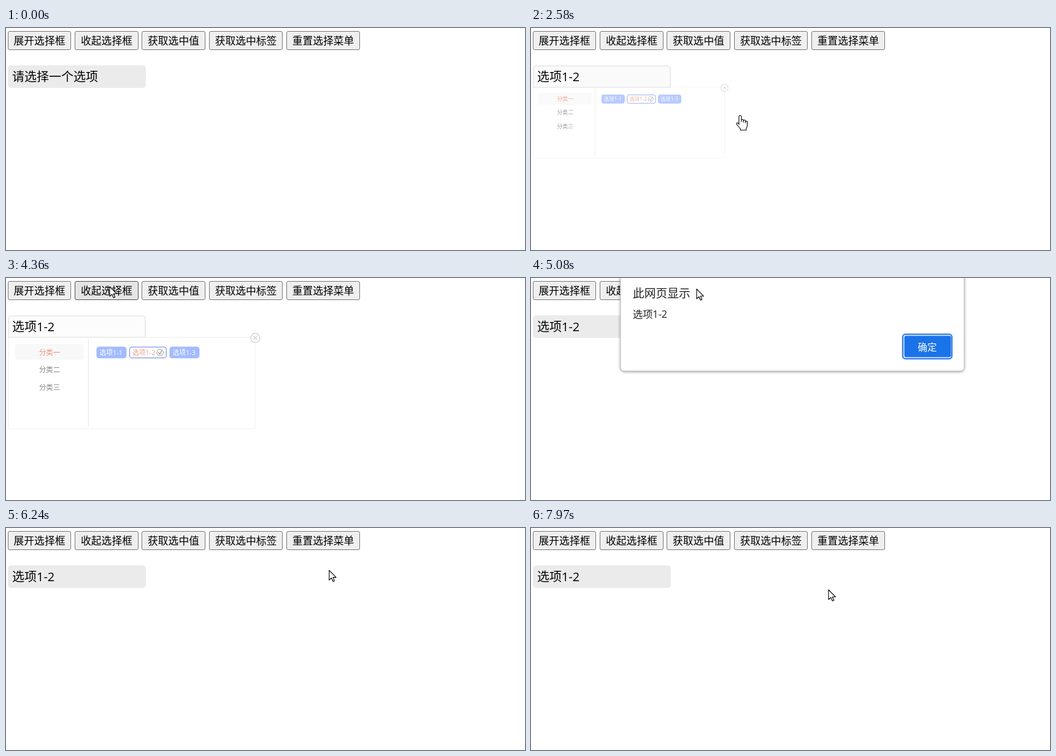
An HTML page that plays this animation: 846x363 px, repeating every 8 s.

```html
<!DOCTYPE html>
<html lang="zh">
<head>
<meta charset="utf-8">
<style>
html, body { margin: 0; width: 100%; height: 100%; overflow: hidden; background: #fff }
svg { display: block; font-family: "Open Sans", "Noto Sans CJK SC", "Noto Sans CJK", sans-serif }
.mid { text-anchor: middle }
</style>
</head>
<body>
<svg id="stage" width="846" height="363" viewBox="0 0 846 363">
  <g id="buttons" font-size="16.8" class="mid"></g>

  <path id="head" stroke="#ebebeb" stroke-width="2"/>
  <text id="value" x="10" y="86.5" font-size="20"></text>

  <g id="panel">
    <rect x="1" width="633" height="235" rx="6" fill="#fff" stroke="#ebebeb" stroke-width="2"/>
    <rect x="19" y="18.5" width="174" height="38" rx="6" fill="#f5f5f5" stroke="#ededed"/>
    <g class="mid" font-size="18" fill="#3c3c46">
      <text x="107" y="45" fill="#de5230">分类一</text>
      <text x="107" y="90">分类二</text>
      <text x="107" y="135">分类三</text>
    </g>
    <path d="M206.5 5V229" stroke="#dedede" stroke-width="2"/>
    <g id="options" font-size="17" font-weight="500"></g>
    <g id="check" fill="none" stroke="#555" stroke-width="1.5">
      <circle cx="390" cy="39" r="8.3"/>
      <path d="M385.500 38.500l4 5 5-10" stroke-width="2"/>
    </g>
    <g stroke="#b8b8b8" stroke-width="2.2">
      <circle cx="634" cy="1.500" r="11.700" fill="#fff"/>
      <path d="M629.500-3l9 9m0-9l-9 9"/>
    </g>
  </g>

  <g id="dialog">
    <rect x="146" y="-20" width="560" height="172" rx="6" fill="#fff" stroke="#c4c4c4"
      style="filter:drop-shadow(0 1px 2px #0006)"/>
    <text x="166" y="32" font-size="18.800" fill="#202124">此网页显示</text>
    <text id="message" x="166" y="65" font-size="16.200" fill="#202124"></text>
    <rect x="606" y="92" width="80" height="40" rx="4.500" fill="#fff" stroke="#3b82ec" stroke-width="2.500"/>
    <rect x="608.500" y="94.500" width="76" height="35" rx="3" fill="#1a73e8"/>
    <text class="mid" x="646" y="118.500" font-size="15.500" fill="#fff">确定</text>
  </g>

  <g id="cursor" fill="#fff" stroke="#000" stroke-width="1.1" stroke-linejoin="round">
    <path id="arrow" d="M0 0V16L3.700 12.600 6.300 18.300 8.700 17.200 6.200 11.700H11.300Z"/>
    <path id="hand" d="M-2 15V2Q-2 0 0 0T2 2V10V8Q2 6.500 3.600 6.500T5.300 8V11V9Q5.300 7.500 7 7.500T8.600 9V12V11Q8.600 9.200 10.200 9.200T11.600 11V16Q11.600 19 9.800 21V24H.5V22L-5 15.500Q-7 12.800-5 12Q-3.800 11.600-2 14Z"/>
  </g>
</svg>
<script>
const LOOP = 8000;
const $ = id => document.getElementById(id);
const set = (el, attrs) => { for (const k in attrs) el.setAttribute(k, attrs[k]); };
const add = (parent, tag, attrs, text = '') => {
  const el = document.createElementNS('http://www.w3.org/2000/svg', tag);
  set(el, attrs);
  el.textContent = text;
  return parent.appendChild(el);
};
const show = (el, on) => { el.style.display = on ? '' : 'none'; };

const buttons = [
  ['展开选择框', 3, 103], ['收起选择框', 112, 104], ['获取选中值', 221, 104],
  ['获取选中标签', 331, 120], ['重置选择菜单', 457, 120]
].map(([label, x, w]) => {
  const box = add($('buttons'), 'rect', { x: x + .5, y: 5.5, width: w - 1, height: 30, rx: 2.5 });
  add($('buttons'), 'text', { x: x + w / 2, y: 27 }, label);
  return { x, w, box };
});

const options = [1, 2, 3].map(n => ({
  box: add($('options'), 'rect', { y: 25, height: 28, rx: 6, 'stroke-width': 2 }),
  text: add($('options'), 'text', { y: 45.5 }, '选项1-' + n)
}));

// cursor path: time, x, y
const path = [
  [690, 11, 144], [1000, 136, 73], [1900, 136, 73], [2330, 341, 143], [2620, 341, 143],
  [3280, 50, 18], [3690, 50, 18], [3890, 169, 14], [4400, 169, 14], [4670, 270, 18],
  [5100, 270, 18], [5540, 561, 149], [5770, 645, 114], [5900, 645, 114], [6630, 392, 18],
  [6850, 392, 18], [6930, 454, 97], [7120, 540, 142], [7570, 645, 114], [7690, 645, 114],
  [7970, 485, 101], [LOOP, 485, 101]
];
const presses = [[0, 3430], [1, 4210], [2, 4990], [3, 6780]];
const within = (v, a, b) => v >= a && v < b;
const ramp = (t, start) => Math.min(1, Math.max(0, (t - start) / 200));
const ease = x => 1 - (1 - x) ** 2.35;

function cursorAt(t) {
  const i = Math.max(1, path.findIndex(p => p[0] > t));
  const [t0, x0, y0] = path[i - 1], [t1, x1, y1] = path[i];
  const k = (t - t0) / (t1 - t0);
  return [x0 + (x1 - x0) * k, y0 + (y1 - y0) * k];
}

function openness(t, f) {
  return f(ramp(t, 1285)) - f(ramp(t, 2529)) + f(ramp(t, 3510)) - f(ramp(t, 4326));
}

function drawOptions(hover, chosen) {
  let x = 227;
  options.forEach(({ box, text }, i) => {
    const lit = i === 1 && (hover || chosen);
    const w = i === 1 && chosen ? 96 : 77;
    set(box, { x: x + 1, width: w - 2, fill: lit ? '#fff' : '#6e95ff', stroke: lit ? '#3f5bdc' : '#6e95ff' });
    set(text, { x: x + 8, fill: lit ? '#de6a45' : '#fff' });
    x += w + 7;
  });
  show($('check'), chosen);
}

function draw(t) {
  const [x, y] = cursorAt(t);
  const visible = t >= 690;
  const first = within(t, 4990, 5860), second = within(t, 6780, 7650);
  const modal = first || second;
  const chosen = t >= 2500;

  buttons.forEach((b, i) => {
    const hover = visible && !modal && within(x, b.x, b.x + b.w) && within(y, 5, 36);
    const down = presses.some(([n, at]) => n === i && within(t, at, at + 80));
    set(b.box, {
      fill: down ? '#f5f5f5' : hover ? '#e5e5e5' : '#efefef',
      stroke: hover ? '#4f4f4f' : '#767676'
    });
  });

  const fade = openness(t, v => v);
  const grey = Math.round(235 + 20 * fade);
  set($('head'), {
    fill: `rgb(${grey},${grey},${grey})`,
    d: fade > 0 ? 'M4 97V67Q4 62 9 62H222Q227 62 227 67V97Z'
      : 'M9 62H222Q227 62 227 67V92Q227 97 222 97H9Q4 97 4 92V67Q4 62 9 62Z'
  });
  $('value').textContent = chosen ? '选项1-2' : '请选择一个选项';

  const size = openness(t, ease);
  const overOption = t < 2640 && within(x, 315, 392) && within(y, 121, 151);
  show($('panel'), size > .01);
  set($('panel'), { transform: `translate(3 97) scale(${size})`, opacity: size });
  drawOptions(overOption, chosen);

  show($('dialog'), modal);
  $('message').textContent = first ? '选项1-2' : '分类一';

  const hand = overOption || !modal && within(x, 3, 228) && within(y, 61, 98);
  show($('cursor'), visible);
  show($('hand'), hand);
  show($('arrow'), !hand);
  set($('cursor'), { transform: `translate(${x} ${y})` });
}

function tick() {
  draw(performance.now() % LOOP);
  requestAnimationFrame(tick);
}
tick();
</script>
</body>
</html>
```
